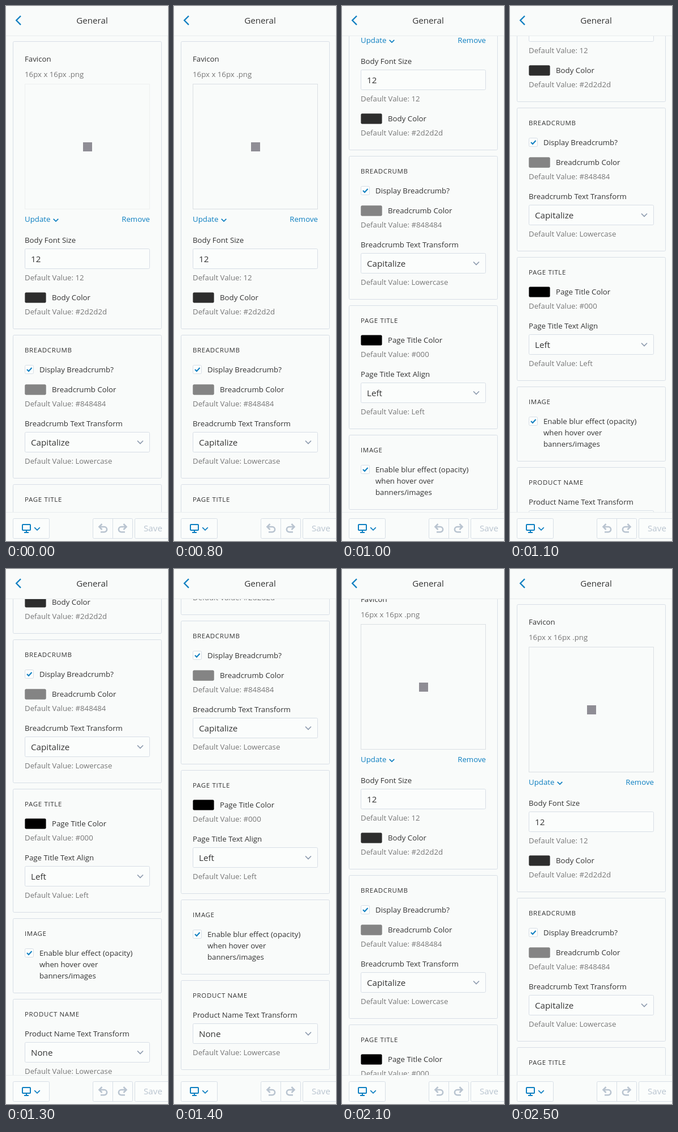
Animation of 286 by 942 pixels, one loop 4000 ms. Source, as an HTML page:

```html
<!DOCTYPE html>
<html lang="en">
<head>
<meta charset="utf-8">
<title>Theme settings</title>
<style>
html, body { margin: 0; width: 100%; height: 100%; overflow: hidden; background: #f9fbfa; }
svg { display: block; width: 286px; height: 942px; }
text { font: 13.25px "Open Sans", "Noto Sans", sans-serif; fill: #333; }
.muted { fill: #777; }
.link { fill: #0d7fc1; }
.big { font-size: 15.2px; }
.head { font-size: 11.5px; letter-spacing: .65px; }
.box { fill: #fbfdfc; stroke: #d7dee6; }
.line { fill: none; stroke-width: 1.7; }
</style>
</head>
<body>
<svg viewBox="0 0 286 942">
  <defs><clipPath id="view"><rect y="52" width="286" height="840"/></clipPath></defs>
  <g clip-path="url(#view)"><g id="page"></g></g>
  <g id="bars"></g>
</svg>
<script>
const BLUE = '#0d7fc1', GREY = '#b9c4d0';

const text = (x, y, s, cls = '', more = '') => `<text x="${x}" y="${y}" class="${cls}" ${more}>${s}</text>`;
const line = (d, color, width = 1.7) => `<path class="line" d="${d}" stroke="${color}" style="stroke-width:${width}"/>`;
const box = (x, y, w, h, more = '') => `<rect class="box" x="${x + .5}" y="${y + .5}" width="${w - 1}" height="${h - 1}" rx="2" ${more}/>`;
const chevron = (x, y, r, color) => line(`M${x - r} ${y - r / 2}l${r} ${r}l${r} ${-r}`, color);

const card = (y, end, title) => box(12, y, 263, end - y, 'style="fill:none"') + (title ? text(33, y + 31, title, 'head') : '');
const label = (y, s) => text(33, y, s);
const note = (y, s) => text(33, y, s, 'muted');
const field = (y, s) => box(33, y, 221, 36) + text(44, y + 24, s, 'big');
const select = (y, s) => field(y, s) + chevron(237, y + 18, 5, '#8c9bae');
const swatch = (y, color, s) =>
  `<rect x="33.5" y="${y + .5}" width="37" height="18" rx="2" fill="${color}" stroke="#000" stroke-opacity=".15"/>` + text(81, y + 14, s);
const check = (y, ...rows) => box(33, y, 16, 16) + line(`M37 ${y + 8}l3 3l5.5 -6`, BLUE, 2) +
  rows.map((s, i) => text(59, y + 13 + i * 20, s)).join('');

page.innerHTML = [
  card(62, 569),
  label(98, 'Favicon'), note(125, '16px x 16px .png'),
  '<rect id="drop" x="33.5" y="137.5" width="220" height="220" fill="none"/>',
  '<rect x="136" y="240" width="16" height="16" fill="#8f8d95"/>',
  text(33, 380, 'Update', 'link'), chevron(88, 377, 4.3, BLUE),
  text(254, 380, 'Remove', 'link', 'text-anchor="end"'),
  label(417, 'Body Font Size'), field(427, '12'), note(483, 'Default Value: 12'),
  swatch(504, '#2d2d2d', 'Body Color'), note(543, 'Default Value: #2d2d2d'),

  card(579, 832, 'BREADCRUMB'),
  check(632, 'Display Breadcrumb?'),
  swatch(666, '#848484', 'Breadcrumb Color'), note(705, 'Default Value: #848484'),
  label(740, 'Breadcrumb Text Transform'), select(750, 'Capitalize'), note(806, 'Default Value: Lowercase'),

  card(842, 1060, 'PAGE TITLE'),
  swatch(894, '#000', 'Page Title Color'), note(933, 'Default Value: #000'),
  label(968, 'Page Title Text Align'), select(978, 'Left'), note(1034, 'Default Value: Left'),

  card(1070, 1202, 'IMAGE'),
  check(1123, 'Enable blur effect (opacity)', 'when hover over', 'banners/images'),

  card(1212, 1370, 'PRODUCT NAME'),
  label(1278, 'Product Name Text Transform'), select(1288, 'None'), note(1344, 'Default Value: Lowercase')
].join('');

const undo = line('M169.5 912l-5 5l5 5M165 917h8.5a4.6 4.6 0 0 1 0 9.2h-6.5', GREY, 2.6);
bars.innerHTML = [
  '<path d="M0 52.5H286M0 891.5H286" stroke="#e9edee"/>',
  '<path d="M285.5 53V891" stroke="#f0f3f3"/>',
  line('M26 17.5l-7.8 7.8l7.8 7.8', BLUE, 2.3),
  text(152, 31, 'General', 'big', 'text-anchor="middle"'),
  box(12, 902, 65, 36),
  `<rect x="29" y="913" width="14" height="10" rx="1" fill="none" stroke="${BLUE}" stroke-width="2"/>`,
  line('M36 923v4M32 927h8', BLUE, 2),
  chevron(55, 920.5, 4.8, BLUE),
  box(153, 902, 71, 36), '<path d="M188.5 902V938" stroke="#d7dee6"/>',
  undo, `<g transform="matrix(-1 0 0 1 377 0)">${undo}</g>`,
  box(227, 902, 70, 36), text(243, 925, 'Save', 'big', `style="fill:${GREY}"`)
].join('');

// [start time, scroll offset, pointer over the drop area]
const steps = [
  [0, 0, true], [800, 0], [900, 145], [1000, 315], [1100, 400], [1300, 455], [1400, 488],
  [2000, 172], [2100, 40], [2200, 0, true], [2500, 0]
];

function draw() {
  const t = performance.now() % 4000;
  const [, scroll, hover] = steps.findLast(s => s[0] <= t);
  page.setAttribute('transform', `translate(0 ${-scroll})`);
  drop.setAttribute('stroke', hover ? '#eef0f0' : '#dadfe3');
  requestAnimationFrame(draw);
}
draw();
</script>
</body>
</html>
```
